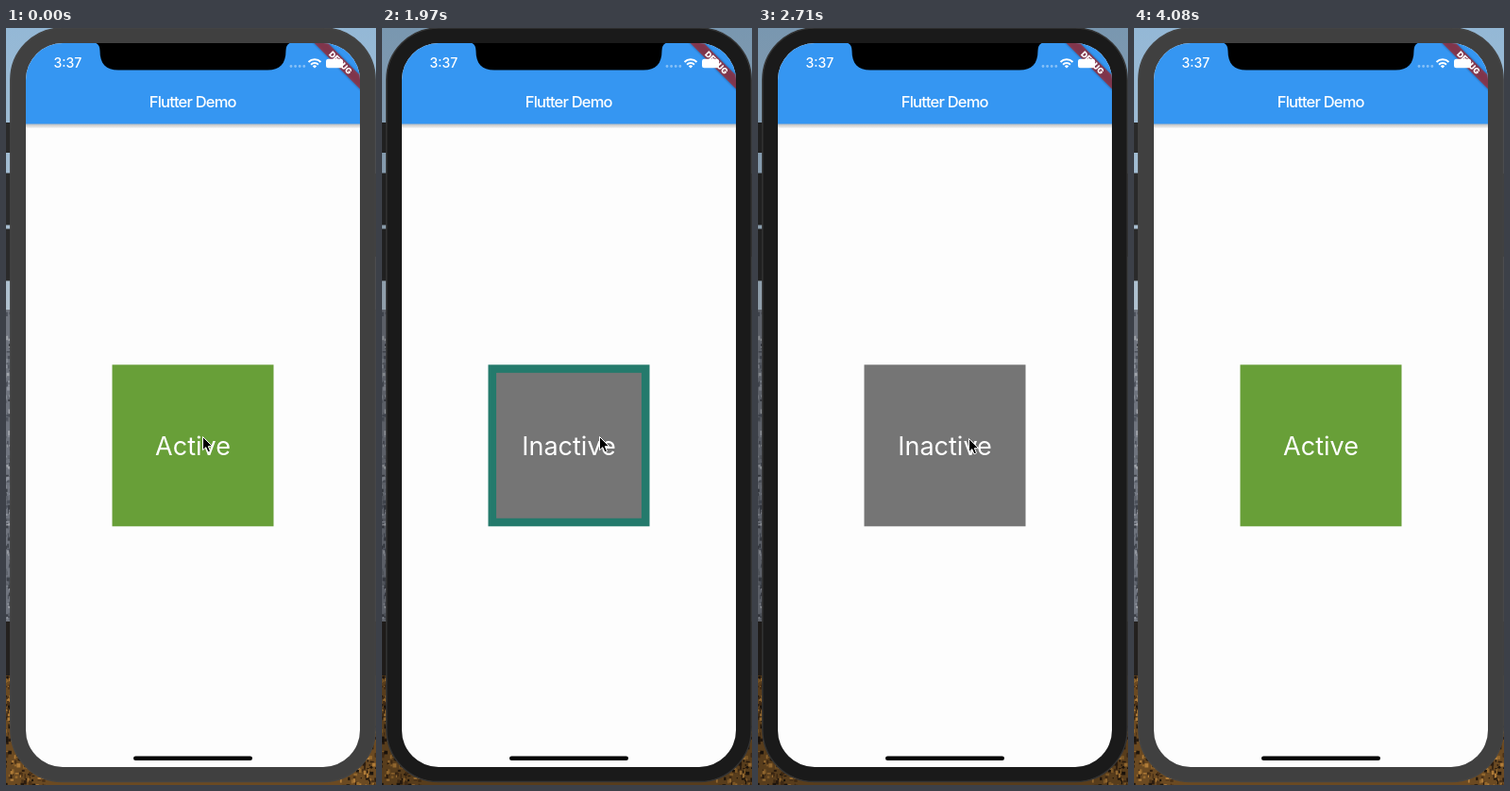
Write an HTML page that moves like this. It is 392 px wide and 801 px high and loops after 4.18 s.

```html
<!DOCTYPE html>
<html lang="en">
<head>
<meta charset="utf-8">
<title>Flutter Demo</title>
<style>
  html, body { margin: 0; width: 100%; height: 100%; overflow: hidden; background: #000; }
  svg { display: block; width: 392px; height: 801px; }
  text { fill: #fff; font-family: Inter, Roboto, sans-serif; text-anchor: middle; }
</style>
</head>
<body>
<svg viewBox="0 0 392 801">
  <defs>
    <linearGradient id="sky" x2="0" y2="1">
      <stop stop-color="#94b8d6"/><stop offset="1" stop-color="#b0c1cf"/>
    </linearGradient>
    <linearGradient id="barShadow" x2="0" y2="1">
      <stop stop-color="#b4b8bc"/><stop offset=".5" stop-color="#d8d8d8"/><stop offset="1" stop-color="#fdfdfd"/>
    </linearGradient>
    <clipPath id="screen"><rect x="21" y="16" width="354" height="766" rx="39"/></clipPath>
    <filter id="blur"><feGaussianBlur stdDeviation="1.6"/></filter>
  </defs>

  <g id="desktop">
    <rect width="392" height="299" fill="url(#sky)"/>
    <rect y="298" width="392" height="330" fill="#6f747e"/>
    <rect y="628" width="392" height="57" fill="#24211f"/>
    <rect y="685" width="392" height="116" fill="#6b4a22"/>
    <g id="texture"></g>
  </g>
  <rect id="shade" width="392" height="801" opacity=".18"/>

  <g id="buttons" fill="#2a2a2a">
    <rect x="-3" y="100" width="9" height="32" rx="1.5"/>
    <rect x="-3" y="153.500" width="9" height="55" rx="1.5"/>
    <rect x="-3" y="212.500" width="9" height="55" rx="1.5"/>
    <rect x="389.500" y="154" width="6" height="88" rx="1.5"/>
  </g>
  <rect id="body" x="4.800" y="0" width="386.400" height="797.500" rx="55" stroke-width="1.4"/>

  <g clip-path="url(#screen)">
    <rect x="21" y="16" width="354" height="766" fill="#fdfdfd"/>
    <rect x="21" y="101" width="354" height="5.500" fill="url(#barShadow)"/>
    <rect x="21" y="16" width="354" height="85.500" fill="#3596f2"/>
    <g transform="translate(375 16) rotate(45)">
      <rect x="-50" y="24" width="100" height="10.260" opacity=".35" filter="url(#blur)"/>
      <rect x="-50" y="24" width="100" height="10.260" fill="#b71c1c" opacity=".63"/>
      <text y="32.300" font-size="8.700" font-weight="900">DEBUG</text>
    </g>
    <path id="notch" d="M92 15 Q99.500 16 99.500 24 C99.500 38 106 44.500 119 44.500 H277 C290 44.500 296.500 38 296.500 24 Q296.500 16 304 15Z"/>
  </g>

  <text x="65.300" y="42" font-size="14" font-weight="500">3:37</text>
  <g fill="#fff" opacity=".4">
    <circle cx="302" cy="40.500" r="1.400"/><circle cx="306.600" cy="40.500" r="1.400"/>
    <circle cx="311.200" cy="40.500" r="1.400"/><circle cx="315.800" cy="40.500" r="1.400"/>
  </g>
  <g fill="none" stroke="#fff" stroke-width="2">
    <path d="M320.500 36 a9.200 9.200 0 0 1 13 0"/>
    <path d="M323.100 38.700 a5.500 5.500 0 0 1 7.800 0"/>
  </g>
  <path d="M327 42.600 l-2.200 -2.200 a3.100 3.100 0 0 1 4.400 0z" fill="#fff"/>
  <rect x="339" y="32.800" width="18" height="9.400" rx="2.500" fill="#fff"/>
  <rect x="358.200" y="35.800" width="1.300" height="3.400" rx=".6" fill="#fff" opacity=".5"/>

  <text x="197.700" y="84" font-size="16.500" font-weight="500" letter-spacing="-.8">Flutter Demo</text>

  <rect id="border" x="112.500" y="356.300" width="171" height="171" fill="#247a6c"/>
  <rect id="box"/>
  <text id="label" x="198" y="451.500" font-size="27"></text>
  <rect x="135" y="770.500" width="126" height="4.600" rx="2.300"/>

  <path id="cursor" d="M0 0 V14.200 L3.300 11.200 L5.500 16.300 L8 15.200 L5.800 10.200 H10.200Z"
        stroke="#fff" stroke-width="1" stroke-linejoin="round"/>
</svg>
<script>
const LOOP = 4180;
const byId = id => document.getElementById(id);
const set = (el, attrs) => Object.entries(attrs).forEach(([k, v]) => el.setAttribute(k, v));

const [shade, buttons, body, border, box, label, cursor] =
  ["shade", "buttons", "body", "border", "box", "label", "cursor"].map(byId);

// Each press shows the highlight; its release toggles the box.
const presses = [[1290, 1380], [1970, 2090], [2590, 2710], [3170, 3260]];

// Cursor moves: start, end, number of steps, destination, acceleration.
const start = [208.500, 432.500];
const moves = [
  [1560, 1700, 6, 230.500, 432.500, 1],
  [2450, 2560, 4, 223.500, 434.500, 1],
  [2940, 3020, 4, 237.500, 439.500, 1],
  [3410, 3680, 11, 402, 812, 1.400],
];

let seed = 7;
const random = () => (seed = seed * 16807 % 2147483647) / 2147483647;

function speckle(count, x, width, top, bottom, colors) {
  for (let i = 0; i < count; i++) {
    const rect = document.createElementNS("http://www.w3.org/2000/svg", "rect");
    set(rect, {
      x: x + random() * width, y: top + random() * (bottom - top),
      width: 1 + random() * 3, height: 1 + random() * 4,
      fill: colors[Math.floor(random() * colors.length)],
    });
    byId("texture").append(rect);
  }
}
const rock = ["#4c515b", "#8d929c", "#5f646d", "#a0a4ab", "#3e424a"];
const grass = ["#2c1d10", "#96692d", "#4b3218", "#b07c38", "#1d150d"];
speckle(140, -2, 6, 300, 625, rock);
speckle(40, -2, 6, 685, 740, grass);
for (const x of [-2, 350]) speckle(150, x, 42, 738, 801, grass);

function cursorAt(t) {
  let [x, y] = start;
  for (const [from, to, steps, endX, endY, power] of moves) {
    if (t < from) break;
    const step = Math.min(steps, Math.floor((t - from) / (to - from) * (steps - 1)) + 1);
    const p = (step / steps) ** power;
    x += (endX - x) * p;
    y += (endY - y) * p;
  }
  return [x, y];
}

function draw(t) {
  const focused = t >= 1230 && t < 4080;
  set(shade, { visibility: focused ? "visible" : "hidden" });
  set(body, { fill: focused ? "#1a1a1a" : "#404040", stroke: focused ? "#343434" : "#444" });
  set(buttons, { fill: focused ? "#202020" : "#2a2a2a" });

  const pressed = presses.some(([down, up]) => t >= down && t < up);
  const active = presses.filter(([, up]) => t >= up).length % 2 === 0;
  const inset = pressed ? 8.550 : 0;
  const size = 171 - 2 * inset;
  set(border, { visibility: pressed ? "visible" : "hidden" });
  set(box, {
    x: 112.500 + inset, y: 356.300 + inset, width: size, height: size,
    fill: active ? "#689f38" : "#757575",
  });
  label.textContent = active ? "Active" : "Inactive";
  set(cursor, { transform: `translate(${cursorAt(t)})` });
}

function tick() {
  draw(performance.now() % LOOP);
  requestAnimationFrame(tick);
}
tick();
</script>
</body>
</html>
```
